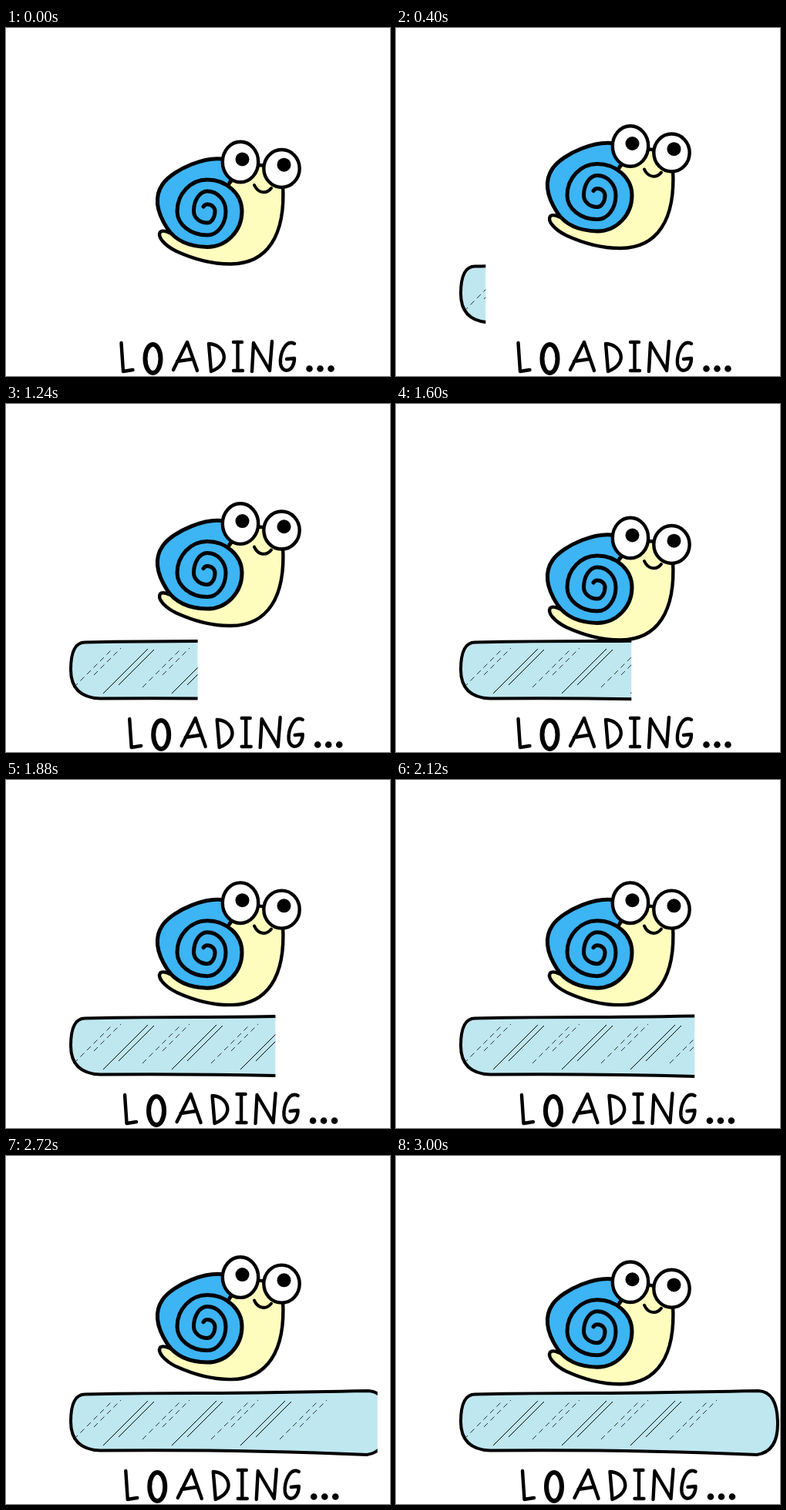
Recreate the animation shown at these times as an HTML page. Size 498 by 452 pixels, loop 3.04 s.

```html
<!DOCTYPE html>
<html lang="en">
<head>
<meta charset="utf-8">
<title>Loading</title>
<style>
  html, body { margin: 0; width: 100%; height: 100%; overflow: hidden; background: #fff; }
  svg { display: block; }
</style>
</head>
<body>
<svg width="498" height="452" viewBox="0 0 498 452" fill="none" stroke="#000"
     stroke-linecap="round" stroke-linejoin="round">
  <defs>
    <clipPath id="reveal"><rect id="revealed" y="290" height="120"/></clipPath>
  </defs>

  <g clip-path="url(#reveal)">
    <path fill="#bee7f0" stroke-width="4" d="M103 309.500Q180 308 250 308T470 305Q494 306 495 345
      T468 388C400 385 300 381 122 382.500Q84 381 84 345T103 309.500Z"/>
    <path id="scratches" stroke-width="1" stroke-linecap="butt"/>
    <path id="dashes" stroke-width=".8" stroke-linecap="butt" stroke-dasharray="7 5"/>
  </g>

  <g id="snail" stroke-width="4.400">
    <path fill="#fffdbe" d="M200 265C196 271 205 282 221 290C243 300 266 307 292 306.500
      C338 306 363 271 359 203C358 188 345 179 328 178L291 199L250 280L212 266Q203 262 200 265Z"/>
    <path id="shell" fill="#3db4f3" stroke-width="5"/>
    <g fill="#fff">
      <ellipse cx="304" cy="174" rx="23.200" ry="26.300"/>
      <ellipse cx="357.500" cy="182.500" rx="23.200" ry="24.500"/>
    </g>
    <g fill="#000" stroke="none">
      <circle cx="306.500" cy="170.500" r="9"/>
      <circle cx="360.500" cy="177.700" r="9"/>
    </g>
    <path stroke-width="4" d="M322 204C327 215 338 216 344 208"/>
  </g>

  <g id="label" role="img" aria-label="LOADING..." stroke-width="4.400">
    <path d="M149.500 409L152 446L164.500 444"/>
    <ellipse cx="190.500" cy="429.500" rx="10" ry="18.500" stroke-width="6"/>
    <path d="M217 444L235 408L248 445M222 433L242 430"/>
    <path d="M263 410L266 446M263 410C284 411 293 436 266 446"/>
    <path d="M295 408H306M300.500 408V444M295 445H307"/>
    <path d="M319 446L321 409L342 445L345 407"/>
    <path d="M374 410C362 404 355 424 356 436C358 450 374 447 374 429L364 430"/>
    <path id="dots" stroke-width="8.600"/>
  </g>
</svg>
<script>
  const LOOP = 3040, STEP = 40, CYCLE = 800;
  const set = (id, name, value) => document.getElementById(id).setAttribute(name, value);
  const repeat = (count, part) => Array.from({ length: count }, (_, i) => part(i)).join('');

  // A 45 degree line between two heights, where x + y equals sum.
  const slant = (sum, low, high) => `M${sum - low} ${low}L${sum - high} ${high}`;

  // Quarter ellipses that join the outermost point of each quarter turn.
  function spiral(cx, cy, extremes) {
    let [x, y] = [cx, extremes[0]];
    return extremes.slice(1).map((edge, i) => {
      const [nx, ny] = i % 2 ? [cx, edge] : [edge, cy];
      const arc = `A${Math.abs(nx - x)} ${Math.abs(ny - y)} 0 0 1 ${nx} ${ny}`;
      [x, y] = [nx, ny];
      return arc;
    }).join('');
  }

  set('shell', 'd', 'M256 232Q258 229 261 229' +
    spiral(261, 238, [229, 271, 253, 243.5, 212, 285, 269, 222, 197, 306, 284.5]) +
    'C238 284 220 277 209 260S190 222 203 203S262 163 290 172L298 190L290 201');

  const SPACING = 89;
  set('scratches', 'd', repeat(3, i =>
    slant(502 + SPACING * i, 376, 318) + slant(511 + SPACING * i, 365, 319)));
  set('dashes', 'd', repeat(4, i =>
    slant(456 + SPACING * i, 368, 317) + slant(466 + SPACING * i, 352, 317)));
  set('dots', 'd', repeat(3, i => `M${393.5 + 14 * i} 442.500h.01`));

  // Straight rise and fall, 0 at the ends of the cycle and 1 in the middle.
  const hop = t => 1 - Math.abs(1 - 2 * (t % CYCLE) / CYCLE);

  // The label glides in, then sways.
  const sway = t => t < CYCLE / 2
    ? 18 * t / CYCLE
    : 9 - 5.5 * Math.sin(2 * Math.PI * t / CYCLE);

  function draw(t) {
    set('snail', 'transform', `translate(0 ${-20.5 * hop(t)})`);
    set('label', 'transform', `translate(${sway(t)} 0)`);
    set('revealed', 'width', 53.3 + 0.1575 * t);
  }

  const start = performance.now();
  function tick() {
    const t = (performance.now() - start) % LOOP;
    draw(Math.floor(t / STEP) * STEP);
    requestAnimationFrame(tick);
  }
  draw(0);
  requestAnimationFrame(tick);
</script>
</body>
</html>
```
